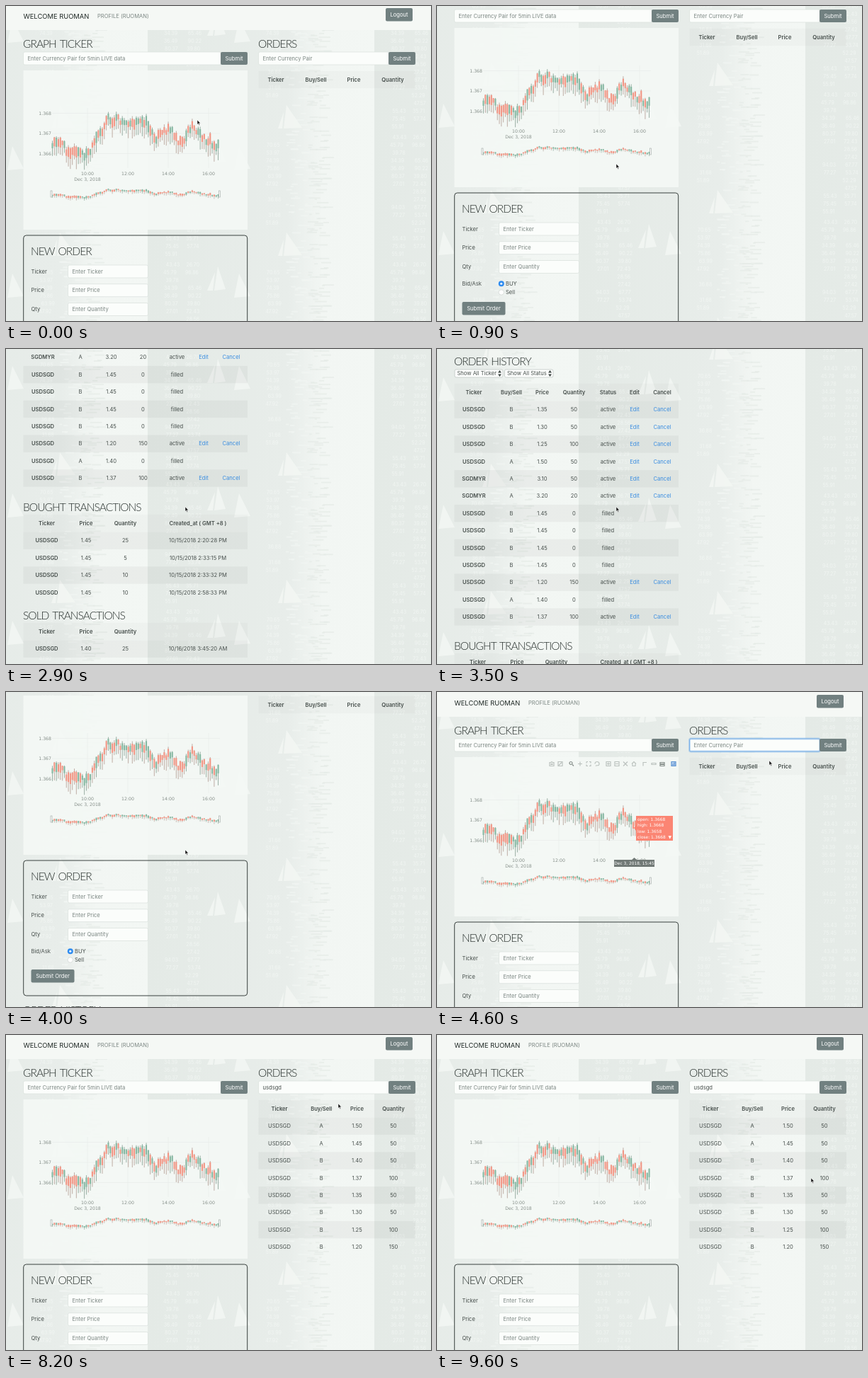
An HTML page for the animation above (10 s loop, 600x445 px).

```html
<!DOCTYPE html>
<html lang="en">
<head>
<meta charset="utf-8">
<title>Trading dashboard</title>
<style>
  html, body { margin: 0; width: 100%; height: 100%; overflow: hidden; background: #f3f7f4; }
  svg { display: block; width: 600px; height: 445px; }
  text { font-family: Inter, Roboto, sans-serif; font-size: 7.6px; fill: #474f4c; white-space: pre; }
  .axis { font-family: "DejaVu Sans", sans-serif; font-size: 6.2px; fill: #87908b; }
  .heading { font-family: Lato, "Open Sans", sans-serif; font-weight: 300; font-size: 15.5px; letter-spacing: -.95px; word-spacing: 2px; fill: #28302d; }
  .brand { font-size: 9.4px; fill: #222b28; }
  .bold { font-weight: 600; }
  .hint { fill: #7c8783; }
  .link { fill: #3a8de0; }
  .light { fill: #fff; }
  .tip { font-family: "DejaVu Sans", sans-serif; font-size: 5.9px; fill: #fff; }
  .small { font-size: 6.4px; }
</style>
</head>
<body>
<svg id="stage" viewBox="0 0 600 445" xmlns="http://www.w3.org/2000/svg"></svg>
<script>
const LOOP = 10000;
const ROW = 24.4;
const USER = 'RUOMAN';

// Drawing helpers; text is centred vertically on y
const text = (x, y, str, cls = '', anchor = 'start') =>
  `<text x="${x}" y="${y}" dy=".36em" class="${cls}" text-anchor="${anchor}">${str}</text>`;
const mid = (x, y, str, cls) => text(x, y, str, cls, 'middle');
const rect = (x, y, w, h, fill, extra = '') =>
  `<rect x="${x}" y="${y}" width="${w}" height="${h}" fill="${fill}" ${extra}/>`;
const path = (d, fill, extra = '') => `<path d="${d}" fill="${fill}" ${extra}/>`;
const group = (id, body) => `<g id="${id}">${body}</g>`;
const rand = n => { const v = Math.sin(n * 12.9898 + 4.1) * 43758.5453; return v - Math.floor(v); };

// Linear interpolation over [key, value] points
function at(points, k) {
  if (k <= points[0][0]) return points[0][1];
  for (let i = 1; i < points.length; i++) {
    const [a, u] = points[i - 1], [b, v] = points[i];
    if (k <= b) return u + (v - u) * (k - a) / (b - a);
  }
  return points[points.length - 1][1];
}

const button = (x, y, w, h, label) =>
  rect(x, y, w, h, '#718080', 'rx="2"') + mid(x + w / 2, y + h / 2, label, 'light');
const field = (x, y, w, h, hint) =>
  rect(x, y, w, h, '#fbfdfb', 'rx="2" stroke="#d9e0dc" stroke-width=".7"') +
  (hint ? text(x + 6, y + h / 2, hint, 'hint') : '');

function backdrop() {
  let numbers = '';
  [[22, 180], [52, 180], [166, 130]].forEach(([x, limit], c) => {
    for (let y = 8; y < limit; y += 11) {
      const n = c * 40 + y;
      if (rand(n) < .2) continue;
      numbers += `<text x="${x + rand(n + 1) * 5}" y="${y}" style="font-size:7px;fill:#f4f8f5" opacity=".75">${(20 + rand(n + 2) * 79).toFixed(2)}</text>`;
    }
  });
  // Ragged edge between the dark and the light part
  let specks = '';
  for (let i = 0; i < 110; i++) {
    const x = 195 + rand(i + 300) * 55, y = rand(i + 500) * 178, w = 3 + rand(i + 700) * 14;
    specks += rect(x, y, w, 2, x < 224 ? '#f2f6f3' : '#e6ebe8', 'opacity=".7"');
  }
  const sails = path('M99 8L110 40L94 42ZM95 16L92 42L84 42ZM129 18L145 50L122 52ZM196 140L218 172L192 173ZM192 150L190 173L184 173Z', '#f4f7f4', 'opacity=".85"');
  return `<defs>
    <linearGradient id="haze"><stop offset="0" stop-color="#e4eae6"/><stop offset=".62" stop-color="#e8edea"/>
      <stop offset=".77" stop-color="#f2f6f3"/><stop offset="1" stop-color="#f3f7f4"/></linearGradient>
    <pattern id="tile" x="200" width="320" height="180" patternUnits="userSpaceOnUse">
      ${rect(0, 0, 320, 180, 'url(#haze)')}${specks}${numbers}${sails}
    </pattern></defs>` + rect(0, -5, 600, 1175, 'url(#tile)');
}

function table(y, columns, heads, rows, style = () => '') {
  const left = columns.left, width = columns.width;
  let out = rect(left, y - ROW / 2, width, ROW, '#000', 'opacity=".02"');
  heads.forEach((h, i) => out += mid(columns.x[i], y, h, 'bold'));
  rows.forEach((cells, r) => {
    const cy = y + ROW * (r + 1) + .3;
    if (r % 2 === 0) out += rect(left, cy - ROW / 2, width, ROW, '#000', 'opacity=".04"');
    cells.forEach((cell, i) => out += mid(columns.x[i], cy, cell, style(i)));
  });
  return out;
}

const price = [[64, 201], [70, 190], [78, 192], [85, 203], [92, 207], [100, 206], [112, 211], [120, 205],
  [126, 190], [132, 181], [138, 172], [143, 156], [150, 166], [157, 158], [165, 166], [178, 163], [186, 166],
  [192, 161], [200, 166], [205, 180], [212, 186], [220, 181], [229, 172], [236, 178], [244, 191], [252, 189],
  [258, 174], [265, 171], [272, 180], [280, 188], [288, 190], [292, 199], [300, 194]];

function candles(scaleY, thin) {
  let out = '';
  for (let i = 0; i < 84; i++) {
    const x = 65.5 + i * 2.82;
    const y = at(price, x) + (rand(i) - .5) * 8;
    const half = 3 + rand(i + 150) * 5;
    const top = y - half - rand(i + 250) * 4;
    const bottom = y + half + 5 + rand(i + 350) * 12;
    const up = rand(i + 450) > .5;
    out += path(`M${x} ${scaleY(top)}V${scaleY(bottom)}`, 'none', `stroke="${up ? '#8fa89b' : '#b9a59c'}" stroke-width="${thin ? .7 : .9}"`);
    out += rect(x - 1.05, scaleY(y - half), 2.1, scaleY(y + half) - scaleY(y - half), up ? '#86b8a2' : '#f29685');
  }
  return out;
}

function modebar() {
  const box = 'M-3-3H3V3H-3Z';
  const icons = ['M-3-2H-1L0-3L1-2H3V3H-3ZM-1 0H1V1H-1Z', box + 'M-2 2L2-2', 'M-3-1A2 2 0 1 1 1-1A2 2 0 1 1-3-1M1 1L3 3',
    'M-3 0H3M0-3V3', 'M-3-3H-1M1-3H3V-1M3 1V3H1M-1 3H-3V1M-3-1V-3', 'M-3 0C-3-4 3-4 3 0S-1 1-2 3',
    box + 'M-2 0H2M0-2V2', box + 'M-2 0H2', 'M-3-3L3 3M3-3L-3 3', 'M-3 0L0-3L3 0M-2 0V3H2V0',
    'M-2 3V-2H3', 'M-3-1H3V1H-3Z', 'M-3-2H3V0H-3ZM-3 1H3V3H-3Z', box + 'M-1 2V0M1 2V-2'];
  const xs = [162, 174, 190, 202, 214, 226, 242, 254, 266, 278, 293, 306, 318, 334];
  return icons.map((d, i) => path(d, i === 13 ? '#b9d2ef' : 'none',
    `transform="translate(${xs[i]} 100.5)" stroke="${i === 13 ? '#5a91d0' : i === 2 || i === 12 ? '#858d89' : '#bbc2be'}" stroke-width="1.2"`)).join('');
}

function chart() {
  let out = rect(24.5, 91, 316.5, 225, '#f4f8f5', 'opacity=".97"');
  [[151.5, '1.368'], [180, '1.367'], [208.5, '1.366']].forEach(([y, label]) => {
    out += path(`M65 ${y}H302`, 'none', 'stroke="#eaeeeb" stroke-width=".8"') + text(64, y, label, 'axis', 'end');
  });
  [[115, '10:00'], [172, '12:00'], [229, '14:00'], [286, '16:00']].forEach(([x, label]) => {
    out += path(`M${x} 144V229`, 'none', 'stroke="#eaeeeb" stroke-width=".8"') + mid(x, 237, label, 'axis');
  });
  out += mid(115, 245, 'Dec 3, 2018', 'axis');
  out += candles(y => y) + candles(y => 257 + (y - 146) * .21, true);
  [63, 300.5].forEach(x => out += rect(x, 261, 2, 9, '#fff', 'stroke="#9aa49f" stroke-width=".6"'));
  const tip = ['open: 1.3668', 'high: 1.3668', 'low: 1.3658', 'close: 1.3668  ▼'];
  return out + group('hover', modebar() +
    path('M281 174H333V209H281V195L278 191L281 187Z', '#fb8573') +
    tip.map((s, i) => text(283, 179 + i * 8.3, s, 'tip')).join('') +
    path('M250 236H275L278.5 233L282 236H307V246H250Z', '#707875') + mid(278.5, 241, 'Dec 3, 2018, 15:45', 'tip'));
}

function orderForm() {
  let out = rect(24.7, 324, 316, 191, 'none', 'rx="4" stroke="#39413e" stroke-width="1"');
  out += text(35, 346, 'NEW ORDER', 'heading');
  [['Ticker', 375], ['Price', 401.7], ['Qty', 428.5]].forEach(([name, y]) => {
    out += text(35.5, y, name) + field(87.5, y - 9, 113, 18, 'Enter ' + (name === 'Qty' ? 'Quantity' : name));
  });
  out += text(35.5, 452, 'Bid/Ask') + text(97, 452, 'BUY') + text(97, 464.3, 'Sell');
  out += '<circle cx="90.8" cy="452.3" r="4" fill="#2f8cf0"/><circle cx="90.8" cy="452.3" r="1.5" fill="#fff"/>' +
    '<circle cx="90.8" cy="464.5" r="3.7" fill="#fff" stroke="#ccd3cf" stroke-width=".7"/>';
  return out + button(35.5, 478, 61, 18.5, 'Submit Order');
}

const select = (x, w, label) =>
  rect(x, 547, w, 11, '#fdfefd', 'rx="2" stroke="#b9c1bd" stroke-width=".7"') + text(x + 3.5, 552.5, label) +
  path(`M${x + w - 7} 551.5L${x + w - 4.5} 548L${x + w - 2} 551.5ZM${x + w - 7} 553.5L${x + w - 4.5} 557L${x + w - 2} 553.5Z`, '#3c4542');

function history() {
  const rows = ['USDSGD B 1.35 50', 'USDSGD B 1.30 50', 'USDSGD B 1.25 100', 'USDSGD A 1.50 50', 'SGDMYR A 3.10 50',
    'SGDMYR A 3.20 20', ...Array(4).fill('USDSGD B 1.45 0'), 'USDSGD B 1.20 150', 'USDSGD A 1.40 0', 'USDSGD B 1.37 100']
    .map(s => s.split(' ')).map(r => r.concat(r[3] === '0' ? ['filled'] : ['active', 'Edit', 'Cancel']));
  return text(24, 535, 'ORDER HISTORY', 'heading') + select(25, 68, 'Show All Ticker') + select(95.5, 68.5, 'Show All Status') +
    table(579, { left: 24.5, width: 316.5, x: [52, 105, 148.5, 193.5, 241.5, 279, 318] },
      ['Ticker', 'Buy/Sell', 'Price', 'Quantity', 'Status', 'Edit', 'Cancel'], rows, i => i === 0 ? 'bold' : i > 4 ? 'link' : '');
}

function transactions(y, title, heads, rows) {
  return text(24, y, title, 'heading') +
    table(y + 23, { left: 24.5, width: 316.5, x: [57.5, 113, 168.5, 271] }, heads, rows, i => i === 0 ? 'bold' : '');
}

function orders() {
  const heads = ['Ticker', 'Buy/Sell', 'Price', 'Quantity'];
  const book = ['A 1.50 50', 'A 1.45 50', 'B 1.40 50', 'B 1.37 100', 'B 1.35 50', 'B 1.30 50', 'B 1.25 100', 'B 1.20 150']
    .map(s => ['USDSGD', ...s.split(' ')]);
  return text(356, 53.5, 'ORDERS', 'heading') +
    group('empty', table(104, { left: 356.5, width: 221.5, x: [381, 437.5, 491, 546] }, heads, [])) +
    group('book', table(104, { left: 356.5, width: 221.5, x: [386, 445.2, 495.5, 547] }, heads, book)) +
    field(356.5, 65, 184, 18) +
    group('focus', rect(356.5, 65, 184, 18, 'none', 'rx="2" stroke="#2f86e5" stroke-opacity=".25" stroke-width="3"') +
      rect(356.5, 65, 184, 18, 'none', 'rx="2" stroke="#7fb2e8" stroke-width="1"')) +
    '<text id="query" x="362.5" y="74" dy=".36em"></text><path id="caret" stroke="#333" stroke-width=".7"/>' +
    button(540, 65, 38, 18, 'Submit') +
    group('menu', rect(356.5, 84, 184, 25.5, '#fdfefd', 'stroke="#bcc4c0" stroke-width=".8"') +
      path('M356.5 82.8H540', 'none', 'stroke="#a9b5b5" stroke-width=".8"') +
      path('M540.3 65V83', 'none', 'stroke="#6f9fd6"') + text(362, 97, 'usdsgd', 'small'));
}

const tradeHeads = ['Ticker', 'Price', 'Quantity'];
const page = backdrop() +
  rect(0, -5, 600, 39, '#f5f8f5') + text(24.5, 14.7, 'WELCOME ' + USER, 'brand') +
  text(129, 14.7, `PROFILE (${USER})`, 'hint') + button(536, 3, 38, 18.5, 'Logout') +
  text(24, 53.5, 'GRAPH TICKER', 'heading') + field(24.5, 65, 279, 18, 'Enter Currency Pair for 5min LIVE data') +
  button(303, 65, 38, 18, 'Submit') + chart() + orders() + orderForm() + history() +
  transactions(937, 'BOUGHT TRANSACTIONS', [...tradeHeads, 'Created_at ( GMT +8 )'],
    [['25', '2:20:28'], ['5', '2:33:15'], ['10', '2:33:32'], ['10', '2:58:33']]
      .map(([qty, time]) => ['USDSGD', '1.45', qty, `10/15/2018 ${time} PM`])) +
  transactions(1090, 'SOLD TRANSACTIONS', tradeHeads, [['USDSGD', '1.40', '25', '10/16/2018 3:45:20 AM']]);

const stage = document.getElementById('stage');
stage.innerHTML = group('page', page) +
  '<path id="cursor" d="M0 0V6.4L1.5 5.1L2.6 7.5L3.6 7L2.5 4.7H4.6Z" fill="#111" stroke="#fff" stroke-width=".5"/>';
const el = id => document.getElementById(id);
const show = (id, on) => el(id).setAttribute('visibility', on ? 'visible' : 'hidden');

const scroll = [[700, 0], [1000, 90], [1400, 310], [1700, 422], [2100, 540], [2500, 680], [2800, 714], [3200, 714],
  [3450, 570], [3700, 310], [4000, 86], [4250, 0], [4400, -1], [4800, -1], [4900, 0]];
const cursorX = [[300, 270], [700, 253], [4250, 253], [4350, 278], [4500, 440], [4600, 469], [8200, 469], [8900, 528]];
const cursorY = [[300, 161], [700, 223], [4250, 223], [4350, 185], [4500, 76], [4600, 97], [8200, 97], [8900, 202]];
const keys = [5600, 5900, 6100, 6300, 6600, 7000];

function draw(t) {
  el('page').setAttribute('transform', `translate(0 ${-Math.round(at(scroll, t))})`);
  el('cursor').setAttribute('transform', `translate(${at(cursorX, t)} ${at(cursorY, t)})`);
  show('cursor', t < keys[0] || t >= 8200);
  show('hover', t >= 4300 && t < 4800);

  const typed = 'usdsgd'.slice(0, keys.filter(k => t >= k).length);
  const query = el('query');
  query.textContent = typed || 'Enter Currency Pair';
  query.setAttribute('class', typed ? '' : 'hint');
  const caretX = 363 + (typed ? query.getComputedTextLength() : 0);
  el('caret').setAttribute('d', `M${caretX} 69.5V78.5`);
  show('caret', typed && t < 7400);
  show('focus', t >= 4500 && !typed);
  show('menu', typed && t < 7700);
  show('book', t >= 7700);
  show('empty', t < 7700);
}

let start;
function frame(now) {
  start ??= now;
  draw((now - start) % LOOP);
  requestAnimationFrame(frame);
}
draw(0);
requestAnimationFrame(frame);
</script>
</body>
</html>
```
